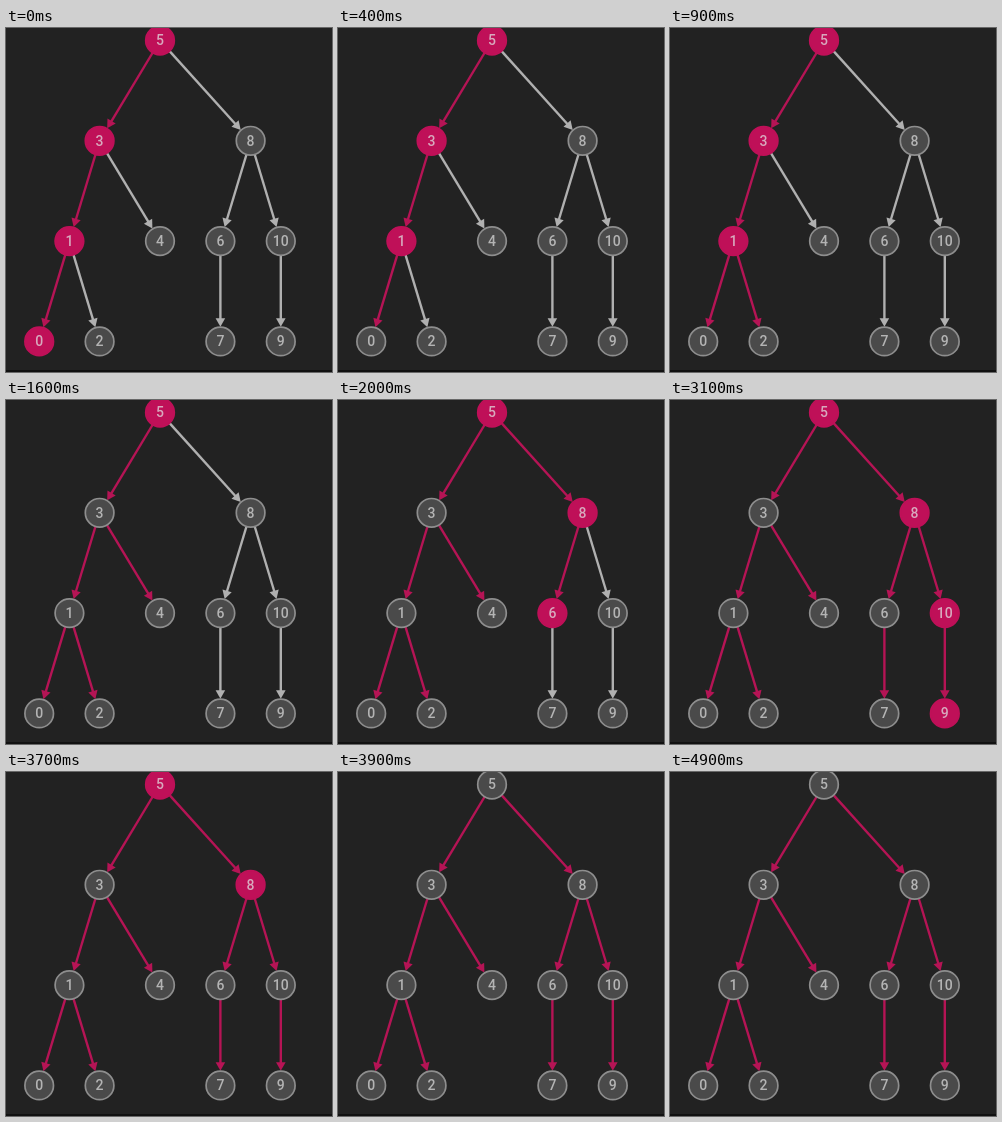
An HTML page with a canvas that plays this animation: 326 by 344 pixels, repeating every 6.9 s.

```html
<!DOCTYPE html>
<html>
<head>
<meta charset="utf-8">
<style>
html, body { margin: 0; width: 100%; height: 100%; overflow: hidden; background: #222; }
canvas { display: block; }
</style>
</head>
<body>
<canvas id="stage" width="326" height="344"></canvas>
<script>
const ctx = document.getElementById('stage').getContext('2d');
const LOOP = 6900, FRAME = 100, RADIUS = 14.3;
// Durations of the traversal steps, in ms
const START = -818, DESCEND = 226, SWITCH = 150, HOLD = 400, BACK = 120;

function insert(tree, label) {
  if (!tree) return { label };
  const side = label < tree.label ? 'left' : 'right';
  tree[side] = insert(tree[side], label);
  return tree;
}

const root = [5, 3, 8, 1, 4, 6, 10, 0, 2, 7, 9].reduce(insert, null);
const nodes = [];
let clock = START, leaves = 0;

// Depth-first walk: leaves fill every second column, parents sit between their children.
function walk(node, depth, parent) {
  const children = [node.left, node.right].filter(Boolean);
  node.parent = parent;
  node.enter = clock;
  nodes.push(node);
  children.forEach((child, i) => {
    clock += i ? SWITCH : DESCEND;
    walk(child, depth + 1, node);
  });
  clock += children.length ? BACK : HOLD;
  node.leave = clock;
  node.col = children.length
    ? Math.floor((children[0].col + children.at(-1).col) / 2)
    : 2 * leaves++;
  node.x = 33.2 + node.col * 30.2;
  node.y = 12.5 + depth * 100.3;
}
walk(root, 0, null);

function drawEdge(from, to, color) {
  const dx = to.x - from.x, dy = to.y - from.y;
  const tip = Math.hypot(dx, dy) - RADIUS - 0.4;
  ctx.save();
  ctx.translate(from.x, from.y);
  ctx.rotate(Math.atan2(dy, dx));
  ctx.strokeStyle = ctx.fillStyle = color;
  ctx.lineWidth = 2.4;
  ctx.beginPath();
  ctx.moveTo(RADIUS, 0);
  ctx.lineTo(tip - 6, 0);
  ctx.stroke();
  ctx.beginPath();
  ctx.moveTo(tip, 0);
  ctx.lineTo(tip - 8.5, -4.8);
  ctx.lineTo(tip - 8.5, 4.8);
  ctx.fill();
  ctx.restore();
}

function drawNode(node, active) {
  ctx.beginPath();
  ctx.arc(node.x, node.y, RADIUS, 0, Math.PI * 2);
  ctx.fillStyle = active ? '#bf1058' : '#4a4a4a';
  ctx.strokeStyle = active ? '#bf1058' : '#8e8e8e';
  ctx.lineWidth = 1.7;
  ctx.fill();
  ctx.stroke();
  ctx.fillStyle = active ? '#d8a9bd' : '#b4b4b4';
  ctx.fillText(node.label, node.x, node.y + 4.9);
}

function draw() {
  const t = Math.floor(performance.now() % LOOP / FRAME) * FRAME;
  ctx.fillStyle = '#222';
  ctx.fillRect(0, 0, 326, 344);
  ctx.fillStyle = '#111';
  ctx.fillRect(0, 342, 326, 2);
  ctx.font = '500 14px Roboto, sans-serif';
  ctx.textAlign = 'center';
  for (const n of nodes)
    if (n.parent) drawEdge(n.parent, n, t >= n.enter ? '#b51455' : '#b0b0b0');
  for (const n of nodes) drawNode(n, t >= n.enter && t < n.leave);
  requestAnimationFrame(draw);
}
draw();
</script>
</body>
</html>
```
